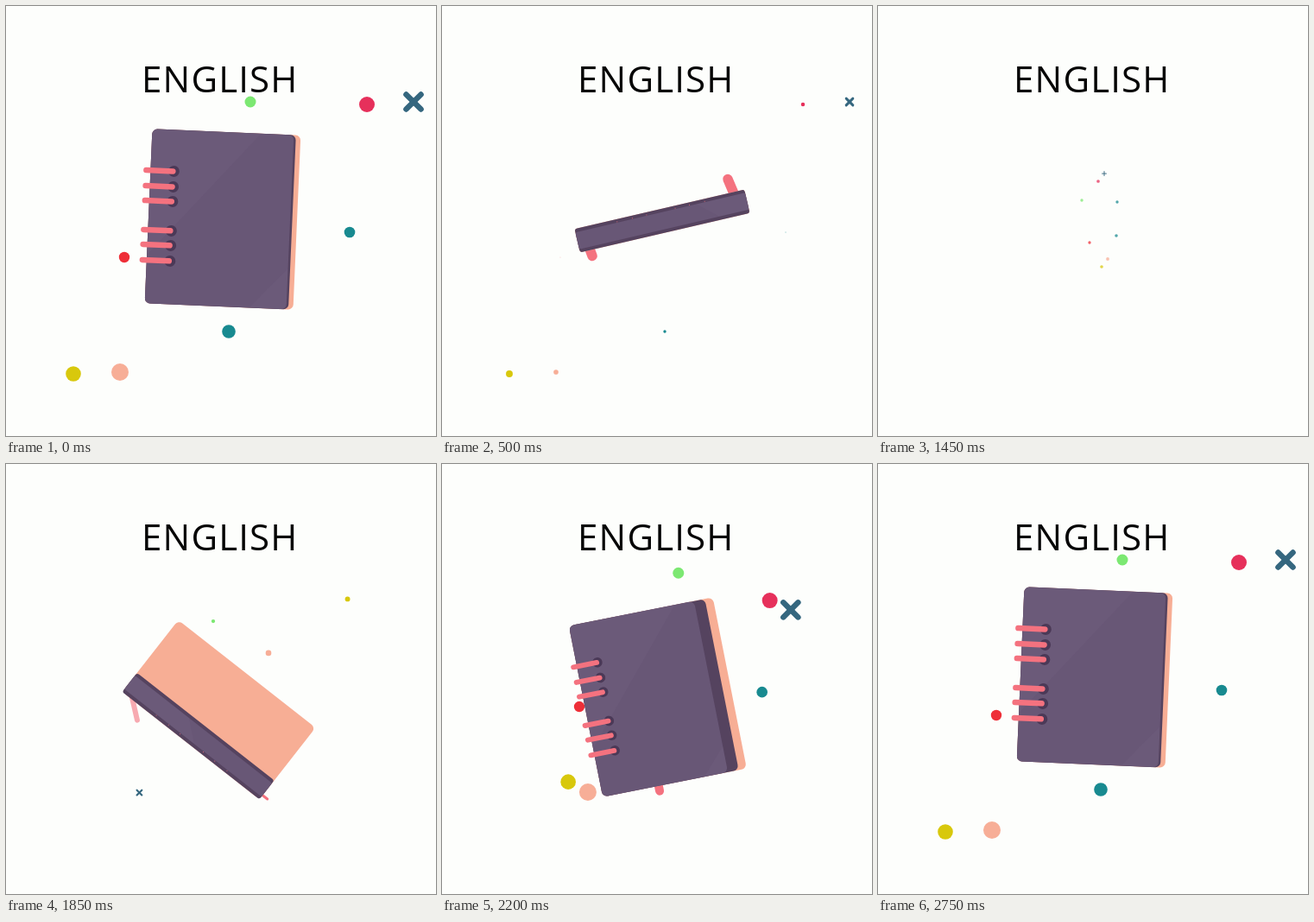
These frames come from a looping animation (498x498 px, 2800 ms). An HTML page with a canvas:

```html
<!DOCTYPE html>
<html lang="en">
<head>
<meta charset="utf-8">
<title>English</title>
<style>
  html, body { margin: 0; height: 100%; overflow: hidden; background: #fdfefc; }
  canvas { display: block; }
</style>
</head>
<body>
<canvas id="stage" width="498" height="498"></canvas>
<script>
const ctx = document.getElementById('stage').getContext('2d');
const LOOP = 2800, STEP = 50, HEIGHT = 202, PINK = '#f4727f';
const RING_Y = [-53, -35, -18, 16, 33, 51];

// x, y: resting place; dx, dy: way back to the book; end: time when shrunk away;
// bx, by: place in the small burst
const dots = [
  { x: 283, y: 111, r: 6.5, color: '#7ce872', dx: -26, dy: 43, end: 480, bx: -20, by: -23 },
  { x: 418, y: 114, r: 9, color: '#e6305b', dx: -108, dy: 124, end: 718, bx: -1, by: -45 },
  { x: 472, y: 111, r: 9.5, color: '#35677f', dx: -192, dy: 163, end: 894, bx: 6, by: -54, cross: true },
  { x: 398, y: 262, r: 6.3, color: '#188a90', dx: -77, dy: 6, end: 592, bx: 21, by: -21 },
  { x: 258, y: 377, r: 7.8, color: '#188a90', dx: -10, dy: -70, end: 693, bx: 20, by: 18 },
  { x: 132, y: 424, r: 10, color: '#f7ae97', dx: 104, dy: -124, end: 742, bx: 10, by: 45 },
  { x: 78, y: 426, r: 8.8, color: '#d8c80c', dx: 192, dy: -163, end: 894, bx: 3, by: 54 },
  { x: 137, y: 291, r: 6.2, color: '#ee2f38', dx: 62, dy: -28, end: 570, bx: -11, by: 26 }
];

const clamp = v => Math.max(0, Math.min(1, v));
const progress = (t, from, to) => clamp((t - from) / (to - from));
const smooth = p => p * p * (3 - 2 * p);
const mix = (a, b, p) => a + (b - a) * p;

function line(x1, y1, x2, y2, width, color) {
  ctx.beginPath();
  ctx.moveTo(x1, y1);
  ctx.lineTo(x2, y2);
  ctx.lineWidth = width;
  ctx.strokeStyle = color;
  ctx.stroke();
}

function disc(x, y, r, color) {
  ctx.beginPath();
  ctx.arc(x, y, r, 0, 7);
  ctx.fillStyle = color;
  ctx.fill();
}

function panel(x, width, color) {
  ctx.beginPath();
  ctx.roundRect(x, -HEIGHT / 2, width, HEIGHT, Math.min(6, width / 9));
  ctx.fillStyle = color;
  ctx.fill();
}

function drawDot(dot, x, y, r, turn = 0) {
  if (r <= 0.1) return;
  if (!dot.cross) return disc(x, y, r, dot.color);
  ctx.save();
  ctx.translate(x, y);
  ctx.rotate(turn);
  const a = r * 0.9;
  line(-a, -a, a, a, r * 0.68, dot.color);
  line(-a, a, a, -a, r * 0.68, dot.color);
  ctx.restore();
}

function drawDots(t) {
  const k = Math.min(1.15, (LOOP - t) / 800);
  const burst = 1 - (1 - progress(t, 700, 1500)) ** 3;
  for (const dot of dots) {
    if (t < 900) {
      drawDot(dot, dot.x, dot.y, dot.r * (1 - smooth(progress(t, 50, dot.end))));
    }
    if (t > 700 && t < 1700) {
      ctx.globalAlpha = 0.75 * (1 - progress(t, 1450, 1650));
      drawDot(dot, 256 + dot.bx * burst, 248 + dot.by * burst,
        mix(1.3, 1.9, dot.r / 10) * progress(t, 700, 850), Math.PI / 4 * progress(t, 950, 1450));
      ctx.globalAlpha = 1;
    }
    if (t > 1800) {
      const back = k ** 3.6;
      drawDot(dot, dot.x + dot.dx * back, dot.y + dot.dy * back, dot.r * progress(t, 1800, 1950));
    }
  }
}

function drawBook(pages, back, front) {
  const left = -pages / 2;
  const inset = left + 4 * (1 - progress(back, 28, 88));
  const open = progress(front, 20, 164);
  panel(left, pages, '#f7ae95');
  panel(left, back, '#55435f');
  panel(inset, front, '#6b5a79');

  // Soft diagonal shine on the cover
  ctx.save();
  ctx.clip();
  ctx.beginPath();
  ctx.moveTo(40, -101);
  ctx.lineTo(-86, 45);
  ctx.lineTo(-86, 101);
  ctx.lineTo(35, 101);
  ctx.lineTo(86, 45);
  ctx.lineTo(86, -101);
  ctx.fillStyle = 'rgba(75, 50, 85, 0.07)';
  ctx.fill();
  ctx.restore();

  for (const y of RING_Y) {
    if (open > 0.15) disc(left + 2 + 25 * open, y, 6.5 * open, '#4b3957');
    line(left + 3 - 8 * open, y, left + 3 + 23 * open, y, 1 + 5.5 * open, PINK);
  }
}

function place(x, y, degrees) {
  ctx.translate(x, y);
  ctx.rotate(degrees * Math.PI / 180);
}

function bookLeaves(t) {
  const fold = smooth(progress(t, 0, 500));
  const shrink = 1 - progress(t, 500, 1000);
  const ribbon = Math.min(1, (1050 - t) / 100) * 11.5;
  place(mix(251, 255, fold), mix(247, 249, fold), 2.5 + 86 * smooth(progress(t, 0, 650)));
  if (t > 250) {
    const out = progress(t, 250, 500);
    line(-30 * shrink * out, -85 * shrink, -7 * shrink, -89 * shrink, ribbon, PINK);
    line(21 * shrink * out, 88 * shrink, 6 * shrink, 90 * shrink, ribbon, PINK);
  }
  const size = 1 - progress(t, 500, 900);
  if (size > 0) {
    ctx.scale(size, size);
    drawBook(mix(172, 28, fold), mix(166.5, 28, fold), mix(164, 20, fold));
  }
}

function bookArrives(t) {
  const k = (LOOP - t) / 800;
  const fold = k ** 7.6;
  const pages = Math.max(28, 172 - 18 * fold);
  const drop = t < 2000 ? smooth(progress(t, 1650, 2000)) : k ** 3.45;
  place(t < 2000 ? mix(255, 241, drop) : 251 - 10 * fold, 247 + 62 * drop, 2.5 - 32.5 * k ** 3);
  const size = smooth(progress(t, 1650, 1800));
  ctx.scale(size, size);

  const left = -pages / 2;
  ctx.globalAlpha = 0.6 * (1 - progress(t, 2000, 2100));
  line(left + 2, -88, left - 15, -67, 6, PINK);
  ctx.globalAlpha = 1;
  const slide = progress(t, 2000, 2200);
  const x = left + mix(6, 66, slide);
  const tip = mix(108, 107, slide) - 14 * progress(t, 2200, 2350);
  line(x, 90, x, tip, mix(3, 10, slide), PINK);

  drawBook(pages, Math.max(28, 166.5 - 53 * fold), Math.max(20, 164 - 144 * fold));
}

function draw(t) {
  ctx.fillStyle = '#fdfefc';
  ctx.fillRect(0, 0, 498, 498);
  ctx.lineCap = 'round';
  drawDots(t);
  ctx.save();
  if (t < 1050) bookLeaves(t);
  else if (t > 1650) bookArrives(t);
  ctx.restore();
  ctx.font = '500 42px "Open Sans", sans-serif';
  ctx.letterSpacing = '1.2px';
  ctx.fillStyle = '#050505';
  ctx.fillText('ENGLISH', 157, 100);
}

function tick() {
  draw(Math.floor(performance.now() % LOOP / STEP) * STEP);
  requestAnimationFrame(tick);
}
tick();
</script>
</body>
</html>
```
